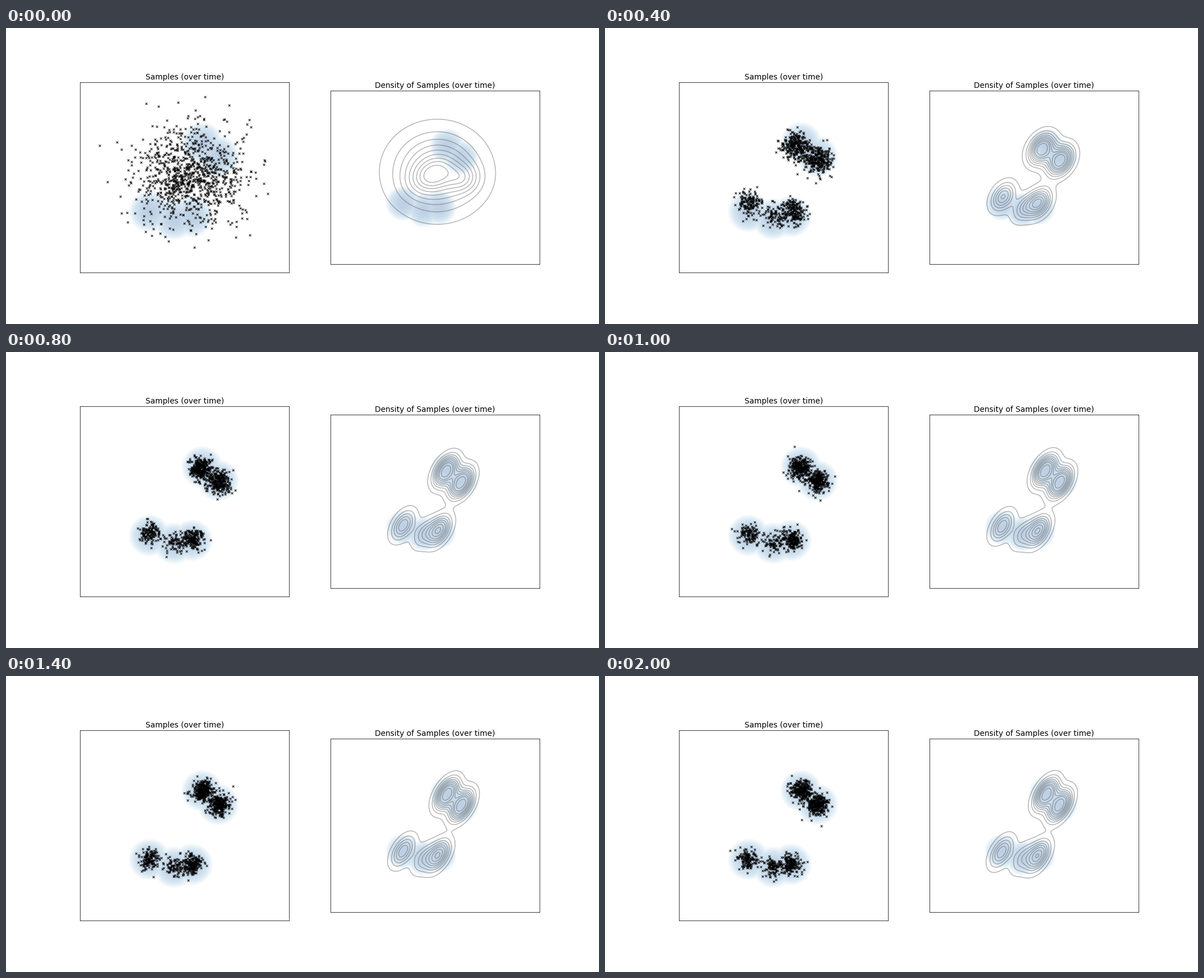
Recreate the animation shown at these times as a matplotlib script. Size 1058 px wide and 529 px high, loop 2200 ms.

```python
import numpy as np
import matplotlib.pyplot as plt
from matplotlib.animation import FuncAnimation
from matplotlib.colors import LinearSegmentedColormap

W, H = 1058, 529
PX = 0.72                      # points per pixel at 100 dpi
FRAMES, STEP_MS = 11, 200
COUNT = 1000
LEFT_BOX = (132.25, 97.1, 505, 437.1)
RIGHT_BOX = (579.2, 112.1, 952.2, 422.1)

plt.rcParams["font.family"] = "DejaVu Sans"

# Cluster centres in left panel pixels, and how far off they begin
TARGET = np.array([(350, 205), (379, 229.5), (256, 328), (300, 342), (332, 337)], float)
OFFSET = np.array([(-15, 11), (1, 13), (6, -25), (2, -8), (3, -19)], float)
WEIGHTS = np.array([0.29, 0.29, 0.14, 0.08, 0.20])


def blob(sx, sy, corr=0.0):
    return [[sx**2, corr * sx * sy], [corr * sx * sy, sy**2]]


def mixture(k):
    """Weights, means and covariances of the sample cloud at step k."""
    if k == 0:
        # broad cloud, tilted core and a bulge to the right
        means = np.array([(329, 260), (317, 268), (384, 273)], float)
        covs = np.array([blob(50, 46), blob(26, 20, -0.45), blob(16, 15)])
        return np.array([0.80, 0.13, 0.07]), means, covs
    means = TARGET + OFFSET * 0.57 ** (k - 1)
    means += np.random.default_rng(70 + k).normal(0, 0.5, means.shape)
    sds = 9.3 + 26 * WEIGHTS * 0.42 ** (k - 1)
    return WEIGHTS, means, np.array([blob(s, s) for s in sds])


def draw_samples(k):
    rng = np.random.default_rng(400 + k)
    weights, means, covs = mixture(k)
    which = rng.choice(len(weights), COUNT, p=weights)
    roots = np.linalg.cholesky(covs)
    noise = rng.normal(size=(COUNT, 2))
    return means[which] + np.einsum("nij,nj->ni", roots[which], noise)


def density(k, x, y):
    """Mixture smoothed with a Scott's-rule kernel."""
    weights, means, covs = mixture(k)
    centred = means - weights @ means
    spread = np.einsum("n,nij->ij", weights, covs) + (centred.T * weights) @ centred
    kernel = spread * COUNT ** (-1 / 3)
    total = np.zeros_like(x)
    for w, (mx, my), cov in zip(weights, means, covs + kernel):
        (a, b), (_, c) = np.linalg.inv(cov)
        dx, dy = x - mx, y - my
        q = a * dx**2 + 2 * b * dx * dy + c * dy**2
        total += w * np.exp(-q / 2) / np.sqrt(np.linalg.det(cov))
    return total


def mass_levels(z):
    """Density levels that cut off equal shares of the mass."""
    values = np.sort(z.ravel())
    mass = np.cumsum(values) / values.sum()
    return values[np.searchsorted(mass, np.linspace(0.05, 1, 10)[:-1])]


def to_right(x, y):
    """Map left panel pixels to right panel pixels."""
    return 787 + 0.84 * (x - 350), 211 + 0.835 * (y - 205)


def make_panel(box, title, glow, corner, far):
    left, top, right, bottom = box
    ax = fig.add_axes([left / W, 1 - bottom / H, (right - left) / W, (bottom - top) / H])
    ax.set_title(title, fontsize=13.75 * PX, pad=4.8 * PX)
    for spine in ax.spines.values():
        spine.set(linewidth=0.92 * PX, color="#2a2a2a")
    ax.imshow(glow, cmap=BLUES, vmin=0, vmax=1, aspect="auto", interpolation="bilinear",
              extent=(corner[0], far[0], far[1], corner[1]), zorder=0)
    ax.set(xlim=(left, right), ylim=(bottom, top), xticks=[], yticks=[])
    return ax


BLUES = LinearSegmentedColormap.from_list(
    "glow", [(0, "white"), (0.5, "#d5e6f2"), (1, "#bed0e4")])
corner, far = (190, 140), (440, 400)
gx, gy = np.meshgrid(np.linspace(190, 440, 300), np.linspace(140, 400, 300))
glow = np.max([1 - ((gx - x)**2 + (gy - y)**2) / 38**2 for x, y in TARGET], axis=0)
glow = glow.clip(0, 1)

fig = plt.figure(figsize=(W / 100, H / 100), dpi=100, facecolor="white")
ax_left = make_panel(LEFT_BOX, "Samples (over time)", glow, corner, far)
ax_right = make_panel(RIGHT_BOX, "Density of Samples (over time)", glow,
                      to_right(*corner), to_right(*far))

marks = ax_left.scatter([], [], s=(3.7 * PX)**2, marker="x", color="black",
                        linewidths=1.15 * PX, alpha=0.82, zorder=2)
kx, ky = np.meshgrid(np.linspace(120, 520, 200), np.linspace(80, 450, 200))
rx, ry = to_right(kx, ky)
rings = []


def update(k):
    marks.set_offsets(draw_samples(k))
    while rings:
        rings.pop().remove()
    z = density(k, kx, ky)
    rings.append(ax_right.contour(rx, ry, z, levels=mass_levels(z), colors="#606060",
                                  linewidths=1.5 * PX, alpha=0.47, zorder=2))
    return [marks]


anim = FuncAnimation(fig, update, frames=FRAMES, interval=STEP_MS, repeat=True,
                     repeat_delay=0, blit=False, cache_frame_data=False)
plt.show()
```
